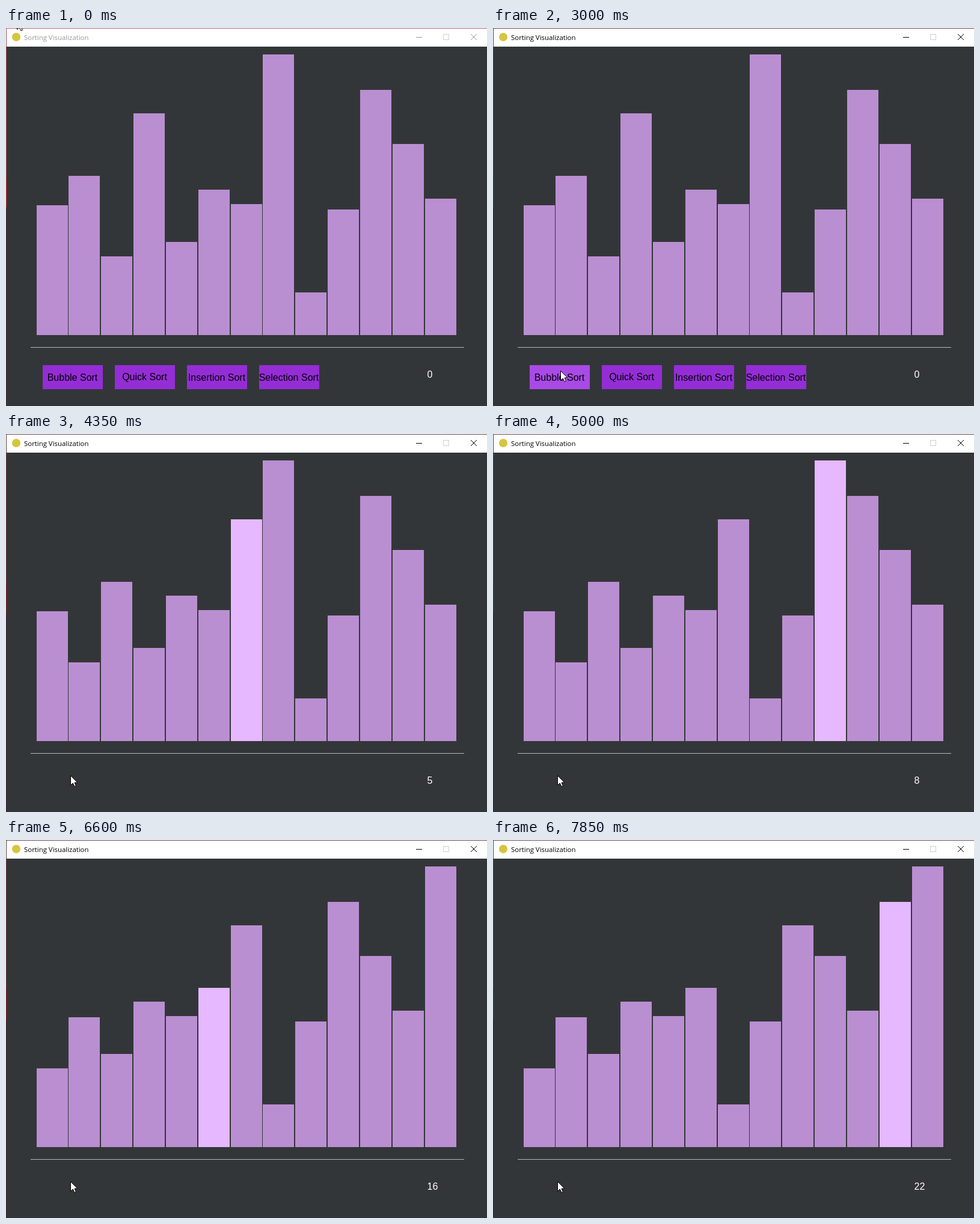
These frames come from a looping animation (800x629 px, 8000 ms). An HTML page:

```html
<!DOCTYPE html>
<html lang="en">
<head>
<meta charset="utf-8">
<title>Sorting Visualization</title>
<style>
html, body { margin: 0; width: 100%; height: 100%; overflow: hidden; background: #333638; }
svg { display: block; width: 800px; height: 629px; }
text { white-space: pre; }
.title { font: 11.4px "Open Sans", "Noto Sans", sans-serif; }
.label, .count { font: 16px "Liberation Sans", Arial, sans-serif; }
.label { text-anchor: middle; }
.count { fill: #fff; }
.idle { --ink: #999; --edge: #b0686f; --side: #a0565e; --glow: #c83a3c; --low: #4e2c30; }
.active { --ink: #000; --edge: #784a4e; --side: #6a4044; --glow: #8c1e20; --low: #3c2528; }
.title { fill: var(--ink); }
.ctl { stroke: var(--ink); fill: none; }
</style>
</head>
<body>
<svg id="win" class="idle" viewBox="0 0 800 629">
  <defs>
    <linearGradient id="side" x2="0" y2="1">
      <stop offset="0" style="stop-color:var(--side)"/>
      <stop offset=".39" style="stop-color:var(--side)"/>
      <stop offset=".4" style="stop-color:var(--glow)"/>
      <stop offset=".47" style="stop-color:var(--glow)"/>
      <stop offset=".48" style="stop-color:var(--low)"/>
      <stop offset="1" style="stop-color:var(--low)"/>
    </linearGradient>
  </defs>
  <g shape-rendering="crispEdges">
    <rect width="800" height="629" fill="#333638"/>
    <rect width="1" height="629" fill="url(#side)"/>
    <rect width="800" height="1" style="fill:var(--edge)"/>
    <rect x="1" y="1" width="799" height="30" fill="#fff"/>
    <rect x="41" y="531" width="721" height="1" fill="#b4b8b6"/>
  </g>
  <circle cx="17" cy="15" r="7" fill="#d6c53e"/>
  <text class="title" x="30" y="20">Sorting Visualization</text>
  <path class="ctl" d="M682 15.5h10"/>
  <rect x="727.5" y="10.5" width="9" height="9" fill="none" stroke="#d0d0d0"/>
  <path class="ctl" d="M773 10l10 10M783 10l-10 10"/>
  <g id="bars" shape-rendering="crispEdges"></g>
  <g id="buttons"></g>
  <text id="count" class="count" x="700.5" y="582">0</text>
  <path id="mouse" d="M.5 .5V16.5L4.3 13L6.9 18.5L9.4 17.5L7 12H11.8Z" fill="#fff" stroke="#000"/>
</svg>
<script>
const LOOP = 8000, TICK = 50, BASE = 511;
const ACTIVATE = 2200, HOVER = 2900, SORT = 3300;
const FIRST = 3319, STEP = 204.2;
const heights = [216, 265, 131, 369, 155, 242, 218, 467, 71, 209, 408, 318, 227];
const labels = [["Bubble Sort", 587], ["Quick Sort", 586], ["Insertion Sort", 587], ["Selection Sort", 587]];

// Pointer path: time, x, y
const path = [
  [0, 18, -14], [300, 18, -14], [550, 38, 65], [800, 76, 240], [1050, 110, 410],
  [1300, 124, 505], [1550, 122, 530], [1800, 118, 549], [2200, 113, 571],
  [2850, 113, 571], [3000, 112, 570], [3300, 112, 570], [3750, 111, 569],
  [3950, 111, 569], [4300, 107, 568], [LOOP, 107, 568]
];

const $ = id => document.getElementById(id);
function add(parent, tag, attrs) {
  const el = document.createElementNS("http://www.w3.org/2000/svg", tag);
  for (const k in attrs) el.setAttribute(k, attrs[k]);
  return parent.appendChild(el);
}

const bars = heights.map((h, i) =>
  add($("bars"), "rect", { x: Math.floor(51 + i * 700 / 13), width: 52 }));

const buttons = labels.map(([name, y], i) => {
  const x = 61 + 120 * i;
  const box = add($("buttons"), "rect", { x, y: 561, width: 100, height: 40 });
  add($("buttons"), "text", { class: "label", x: x + 49.5, y }).textContent = name;
  box.setAttribute("fill", "#942dd6");
  return box;
});

// Bubble sort after `count` further comparisons; `lit` is the right-hand bar
function sortState(count) {
  const a = heights.slice();
  let n = 0;
  for (let end = a.length - 1; end > 0; end--) {
    for (let j = 0; j < end; j++) {
      if (a[j] > a[j + 1]) [a[j], a[j + 1]] = [a[j + 1], a[j]];
      if (n++ === count) return { a, lit: j + 1 };
    }
  }
  return { a, lit: -1 };
}

function pointer(t) {
  const i = path.findIndex(p => p[0] > t);
  const [t0, x0, y0] = path[i - 1], [t1, x1, y1] = path[i];
  const k = (t - t0) / (t1 - t0);
  return [Math.round(x0 + (x1 - x0) * k), Math.round(y0 + (y1 - y0) * k)];
}

function render(time) {
  const t = Math.floor((time % LOOP) / TICK) * TICK;
  const sorting = t >= SORT;
  const count = sorting ? Math.max(0, Math.floor((t - FIRST) / STEP)) : 0;
  const { a, lit } = sorting ? sortState(count) : { a: heights, lit: -1 };
  bars.forEach((bar, i) => {
    bar.setAttribute("y", BASE - a[i]);
    bar.setAttribute("height", a[i]);
    bar.setAttribute("fill", i === lit ? "#e5b8ff" : "#ba8fd2");
  });
  $("count").textContent = count;
  $("win").setAttribute("class", t >= ACTIVATE ? "active" : "idle");
  $("buttons").setAttribute("visibility", sorting ? "hidden" : "visible");
  buttons[0].setAttribute("fill", t >= HOVER ? "#a94ae6" : "#942dd6");
  $("mouse").setAttribute("transform", `translate(${pointer(t)})`);
}

const start = performance.now();
function frame() {
  render(performance.now() - start);
  requestAnimationFrame(frame);
}
frame();
</script>
</body>
</html>
```
